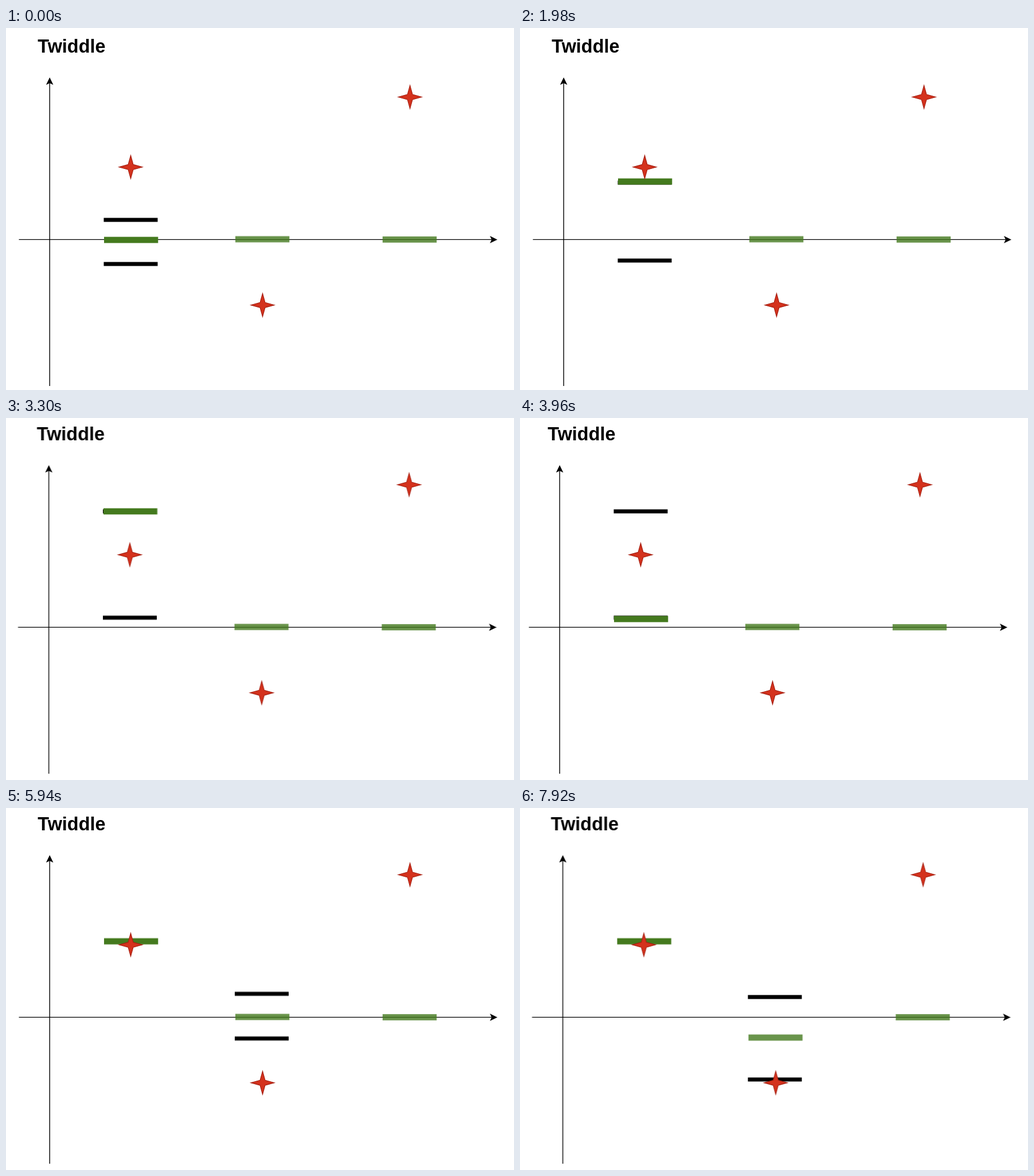
An HTML page that plays this animation: 886x632 px, repeating every 8000 ms.

```html
<!DOCTYPE html>
<html lang="en">
<head>
<meta charset="utf-8">
<title>Twiddle</title>
<style>
  html, body { margin: 0; width: 100%; height: 100%; overflow: hidden; background: #fff; }
  svg { display: block; width: 886px; height: 632px; }
  text { font: bold 32.4px "Liberation Sans", Arial, sans-serif; }
  .axis { stroke: #000; stroke-width: 1.4; }
  .star { fill: #d4321d; stroke: #a82012; stroke-width: 1.2; stroke-miterlimit: 10; }
  .green { fill: #447a1e; }
  .faded { opacity: .8; }

  /* Each step lasts 660 ms = 8.25% of the loop. */
  .stage, .upper, .lower, .first, .second { animation: 8s step-end infinite; }
  .stage { animation-name: stage; }
  .upper { animation-name: upper; }
  .lower { animation-name: lower; }
  .first { animation-name: first; }
  .second { animation-name: second; }

  @keyframes stage {
    0% { transform: translate(0, 0); }
    33% { transform: translate(0, -4px); }
    41.25% { transform: translate(-1.5px, -4px); }
    49.5% { transform: translate(-7px, -4px); }
    57.75% { transform: translate(0, -4px); }
    90.75%, 100% { transform: translate(-1.5px, -4px); }
  }
  @keyframes upper {
    0% { transform: translate(170.5px, 335px); }
    16.5% { transform: translate(170.5px, 270px); }
    33% { transform: translate(170.5px, 167px); }
    57.75% { transform: translate(170.5px, 237px); }
    74.25% { transform: translate(399px, 328.4px); }
    99%, 100% { transform: translate(399px, 334px); }
  }
  @keyframes lower {
    0% { transform: translate(170.5px, 412px); }
    16.5% { transform: translate(170.5px, 406px); }
    33% { transform: translate(170.5px, 352.6px); }
    57.75% { transform: translate(170.5px, 455px); }
    74.25% { transform: translate(399px, 406.4px); }
    99%, 100% { transform: translate(399px, 478px); }
  }
  @keyframes first {
    0% { transform: translate(171px, 370px); }
    8.25% { transform: translate(171px, 335px); }
    24.75% { transform: translate(171px, 268px); }
    41.25% { transform: translate(171px, 167px); }
    49.5% { transform: translate(171px, 355px); }
    57.75% { transform: translate(171px, 351.2px); }
    66%, 100% { transform: translate(171px, 236.7px); }
  }
  @keyframes second {
    0% { transform: translate(400px, 368.8px); }
    82.5% { transform: translate(400px, 328.4px); }
    90.75%, 100% { transform: translate(400px, 404.8px); }
  }
</style>
</head>
<body>
<svg viewBox="0 0 886 632">
  <defs>
    <path id="head" d="M0 0 L-13 6.3 L-10 0 L-13 -6.3 Z"/>
    <path id="star" d="M0 -20.3 L4.4 -4.4 L20.3 0 L4.4 4.4 L0 20.3 L-4.4 4.4 L-20.3 0 L-4.4 -4.4 Z"/>
    <rect id="bar" y="-3.5" width="94" height="7"/>
    <rect id="block" y="-5.4" width="94.3" height="10.8"/>
  </defs>
  <g class="stage">
    <text x="55.3" y="43.3">Twiddle</text>
    <path class="axis" d="M22.5 369.4 H848 M76.2 625 V95"/>
    <use href="#head" transform="translate(857 369.4)"/>
    <use href="#head" transform="translate(76.2 86.3) rotate(-90)"/>
    <g class="upper"><use href="#bar"/></g>
    <g class="lower"><use href="#bar"/></g>
    <g class="green first"><use href="#block"/></g>
    <g class="green faded second"><use href="#block"/></g>
    <g class="green faded" transform="translate(656.8 369.3)"><use href="#block"/></g>
    <g class="star">
      <use href="#star" x="217.5" y="242.8"/>
      <use href="#star" x="447.5" y="483.7"/>
      <use href="#star" x="704.6" y="120.5"/>
    </g>
  </g>
</svg>
</body>
</html>
```
